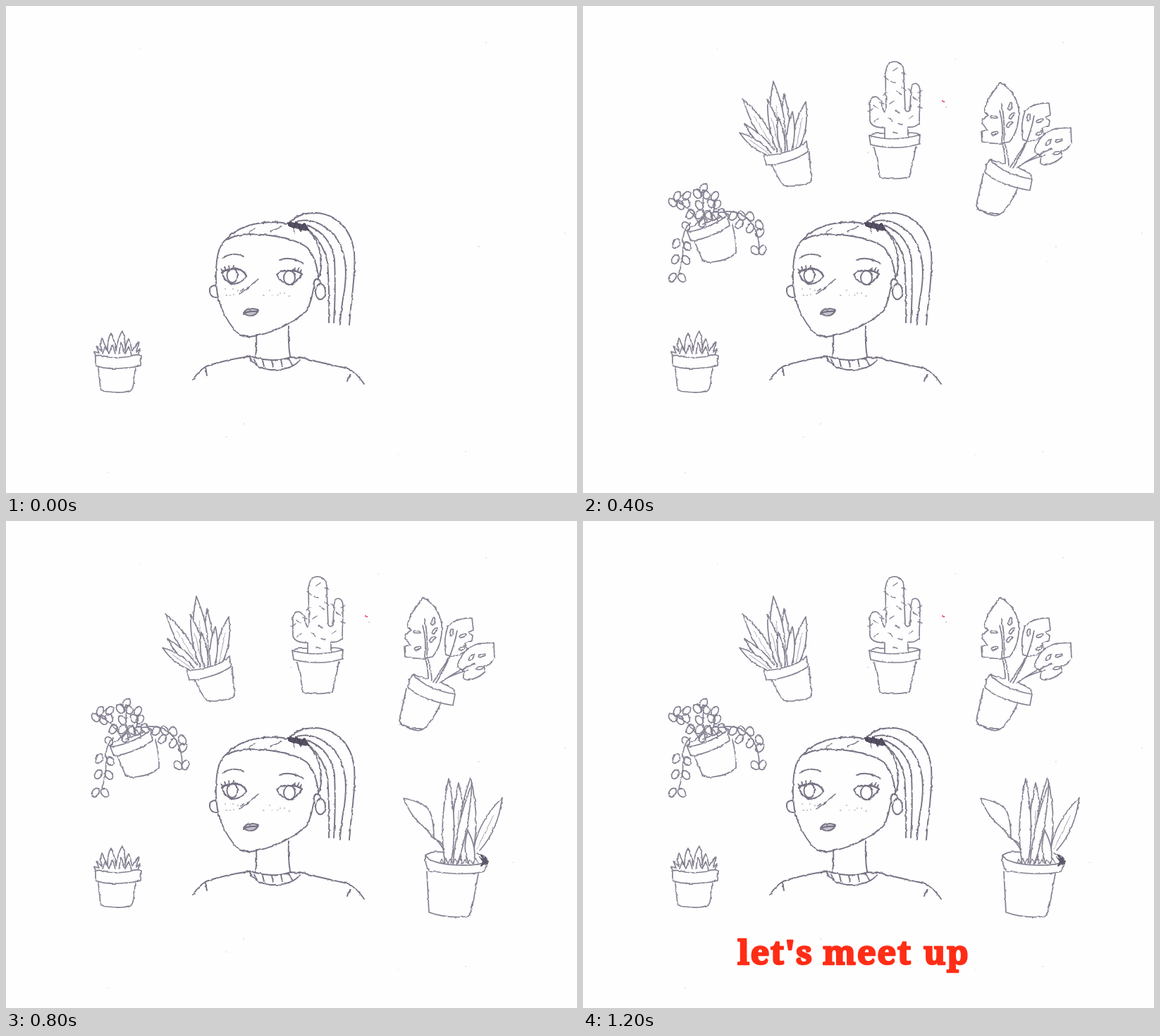
An HTML page for the animation above (1400 ms loop, 810x692 px).

```html
<!DOCTYPE html>
<html lang="en">
<head>
<meta charset="utf-8">
<title>Plants and a portrait</title>
<style>
html, body { margin: 0; width: 100%; height: 100%; overflow: hidden; background: #fefefe; }
svg { display: block; width: 810px; height: 692px; }
.pencil { fill: none; stroke: #858091; stroke-width: 1.7; stroke-linecap: round; stroke-linejoin: round; }
.pencil .solid { fill: #fefefe; }
#girl { stroke: #777183; stroke-width: 1.9; }
.speck { stroke: #c9c6cf; stroke-width: 1.4; }
#message {
  font: 700 47.5px "Noto Serif", "DejaVu Serif", serif; letter-spacing: 1.5px; text-anchor: middle;
  fill: #ff2d16; stroke: #ff2d16; stroke-width: 2.4; stroke-linejoin: round;
}
</style>
</head>
<body>
<svg viewBox="0 0 810 692">
  <filter id="rough" filterUnits="userSpaceOnUse" x="0" y="0" width="810" height="692" color-interpolation-filters="sRGB">
    <feTurbulence type="fractalNoise" baseFrequency=".14" numOctaves="2" seed="4"/>
    <feDisplacementMap in="SourceGraphic" scale="3" xChannelSelector="R" yChannelSelector="G"/>
  </filter>
  <g class="pencil" filter="url(#rough)">
    <g id="girl"></g>
    <g id="succulent"></g>
    <g id="trailing" data-start="100"></g>
    <g id="aloe" data-start="200"></g>
    <g id="cactus" data-start="300"></g>
    <g id="monstera" data-start="400"></g>
    <g id="tall" data-start="500"></g>
  </g>
  <text id="message" y="630"><tspan x="273">let's</tspan><tspan x="403.5">meet</tspan><tspan x="515.5">up</tspan></text>
</svg>
<script>
const byId = id => document.getElementById(id);
const path = (d, attrs = '') => `<path d="${d}" ${attrs}/>`;
const solid = d => path(d, 'class="solid"');
const oval = (x, y, rx, ry, turn = 0, attrs = '') =>
  `<ellipse cx="${x}" cy="${y}" rx="${rx}" ry="${ry}" transform="rotate(${turn} ${x} ${y})" ${attrs}/>`;
const dots = (points, attrs = '') => path(points.map(([x, y]) => `M${x} ${y}h.1`).join(''), attrs);
const specks = points => dots(points, 'class="speck"');

// A pointed leaf whose two edges bow out sideways from base to tip.
function leaf(bx, by, tx, ty, width, rib = false) {
  const dx = tx - bx, dy = ty - by, length = Math.hypot(dx, dy);
  const nx = -dy / length * width, ny = dx / length * width;
  const mx = bx + dx * .45, my = by + dy * .45;
  const edges = `M${bx + nx * .3} ${by + ny * .3}Q${mx + nx} ${my + ny} ${tx} ${ty}` +
    `Q${mx - nx} ${my - ny} ${bx - nx * .3} ${by - ny * .3}`;
  return solid(edges) + (rib ? path(`M${bx} ${by}L${bx + dx * .65} ${by + dy * .65}`, 'stroke-width="1" opacity=".7"') : '');
}

byId('girl').innerHTML =
  // head and hair
  path('M313 331Q302 339 299 362C296 390 299 413 306 430Q316 453 330 466Q338 472 352 469C376 465 401 453 421 438Q432 428 435 407L437 399') +
  path('M313 332Q329 324 346 324C382 325 409 330 427 343Q440 357 443 385') +
  path('M313 331C325 316 350 308 376 307Q391 307 402 310M428 317Q444 334 447 358Q449 375 442 389') +
  path('M345 322L353 315M375 320L389 315M408 318L410 324M383 318L391 313', 'stroke-width="1.4"') +
  path('M403 307Q415 294 440 294C470 296 490 318 494 350C496 380 491 408 489 430L487 453') +
  path('M412 306Q440 299 465 325C483 347 484 375 480 405Q475 430 474 453') +
  path('M428 312Q460 324 466 360Q468 405 465 450M429 318Q450 335 456 365Q459 400 458 450') +
  path('M403 310L425 316', 'stroke-width="7" stroke="#5a5467"') +
  path('M400 308L408 316L412 306L418 319L423 309L429 319', 'stroke="#4b4658"') +
  // ears
  path('M437 397Q436 386 443 388Q447 391 445 396') + oval(446, 406, 7, 11) +
  path('M298 397Q288 397 289 406Q291 415 299 414') +
  // eyes and brows
  path('M307 359Q320 348 337 356M388 361Q402 355 421 365') +
  path('M306 379Q310 392 322 395Q335 394 341 384M384 382Q391 394 402 396Q412 394 420 381') +
  path('M306 379Q318 370 333 375Q339 379 341 384M384 382Q392 374 402 376Q414 376 420 381', 'stroke-width="2.4"') +
  oval(321, 383, 7.5, 10) + oval(402, 386, 8, 10) +
  path('M308 379L305 374M312 376L310 371M317 374L316 369M322 373L323 369M408 376L410 372M413 377L416 372M417 379L420 375') +
  // nose, freckles, mouth
  path('M332 409L358 388M333 405L337 402', 'stroke-width="1.6"') +
  dots([[311, 402], [313, 410], [318, 411], [322, 403], [323, 410], [329, 405],
        [366, 411], [374, 404], [377, 411], [386, 411], [389, 408], [395, 408], [401, 412]], 'stroke-width="1.7" opacity=".7"') +
  path('M337 436Q342 429 346 431Q352 428 358 433Q354 441 345 440Q339 439 337 436ZL347 434L357 434', 'fill="#c4c0cb"') +
  // neck and jumper
  path('M355 467Q356 485 354 498M401 455Q400 480 403 498') +
  path('M345 497L355 500Q380 507 404 499L417 500M346 499Q352 514 375 517Q405 518 417 503') +
  path('M352 502L355 509M364 504L366 512M377 504L379 513M390 503L392 512M401 501L406 510') +
  path('M345 498Q310 503 284 512Q274 518 265 531M283 514L285 525M417 499Q450 508 485 515Q498 522 508 537M489 524Q485 528 484 533') +
  specks([[191, 61], [313, 612], [337, 594], [556, 638], [145, 663], [671, 342], [793, 323], [652, 633], [680, 52]]);

byId('succulent').innerHTML =
  path('M127 496L125 491L132 493L128 483L136 491Q133 480 136 472L144 490Q144 472 149 465Q154 475 156 490' +
       'Q159 470 165 462Q170 475 169 489Q171 478 174 472L179 490L188 477L185 492L190 487L187 496') +
  path('M137 494L141 483L146 494L151 481L155 494M160 494L163 478L169 494L174 484L178 495') +
  solid('M127 497Q135 495 145 499Q160 501 175 498Q186 494 192 497L191 511Q180 514 160 515Q140 516 127 511Z') +
  path('M131 515L134 543Q136 548 145 548Q165 551 178 546Q182 540 183 514');

const leaves = [
  [146, 313], [132, 338], [148, 341], [131, 360], [146, 361], [127, 386], [140, 386],
  [213, 298], [225, 298], [222, 310], [237, 299], [237, 316], [250, 311], [251, 322], [244, 347], [255, 346],
  [127, 279], [134, 270], [138, 283], [147, 270], [146, 280], [152, 296], [162, 267], [171, 259], [174, 268],
  [187, 270], [182, 281], [190, 282], [165, 283], [165, 296], [178, 297], [187, 298], [197, 295], [170, 308]
];
byId('trailing').innerHTML =
  path('M152 308Q140 320 142 340Q142 365 135 382M200 292Q225 290 240 310Q250 325 250 345') +
  path('M165 310Q152 285 130 276M173 308Q168 280 172 262M180 306Q188 290 187 275M158 312L180 290L192 306M170 310L196 300') +
  leaves.map(([x, y], i) => oval(x, y, 4.8, 6.8, i % 2 ? 32 : -35)).join('') +
  solid('M148 321Q166 319 184 310Q198 304 205 296L208 312Q182 330 153 334Z') +
  path('M148 321Q150 314 160 311M205 296Q200 291 192 294') +
  path('M158 334L169 360Q172 365 182 364Q205 362 217 351Q218 335 212 311') +
  specks([[528, 75], [515, 144]]);

byId('aloe').innerHTML =
  leaf(290, 204, 285, 125, 10) + leaf(280, 207, 270, 107, 17, true) + leaf(302, 202, 316, 136, 13, true) +
  leaf(271, 202, 227, 132, 13, true) + leaf(279, 206, 262, 133, 11, true) + leaf(293, 205, 297, 150, 9) +
  leaf(269, 207, 229, 168, 9) + leaf(263, 209, 222, 180, 10, true) + leaf(284, 207, 277, 158, 8) +
  solid('M256 211Q264 214 290 207Q308 202 317 192L319 207Q305 217 285 222Q268 227 260 225Z') +
  path('M268 226Q276 245 285 255Q300 258 318 252Q325 250 324 246Q322 230 321 207');

const spikes = [
  [430, 103], [429, 125], [455, 96], [455, 118], [443, 90], [440, 108], [448, 124], [438, 137], [446, 150], [436, 162],
  [408, 148], [424, 138], [415, 144], [416, 162], [450, 168], [464, 121], [478, 122], [478, 144], [471, 132], [466, 158], [443, 180]
];
byId('cactus').innerHTML =
  path('M428 189L428 173Q409 173 407 163L407 138Q408 128 416 129Q424 131 424 143L427 150Q430 150 430 145L429 95Q431 79 442 79' +
       'Q455 80 455 95L457 147Q459 152 464 148L465 122Q466 110 472 110Q479 112 478 125L477 165Q474 173 461 172L461 188') +
  path(spikes.map(([x, y], i) => `M${x - 3} ${y - [3, -2, 1][i % 3]}l6 ${[5, -4, 2][i % 3]}`).join(''), 'stroke-width="1.4"') +
  solid('M406 184Q440 194 478 183L477 196Q445 206 408 197Z') +
  path('M406 184Q413 180 427 181M462 180Q474 180 478 183') +
  path('M413 201Q419 225 421 243Q440 248 463 243Q468 225 472 200') +
  dots([[510, 135], [512, 136]], 'stroke="#d83a5c" stroke-width="2"') +
  specks([[515, 144], [659, 363], [405, 208]]);

byId('monstera').innerHTML =
  path('M594 139Q599 170 597 192Q603 208 604 226M591 148Q597 170 594 192Q599 210 599 224M640 155Q634 192 610 230M630 192Q620 208 606 229M665 203Q638 213 616 230M655 212Q630 219 618 228') +
  path('M591 109Q612 118 618 145Q620 175 605 193Q590 198 566 193L565 178L574 176L566 167L568 160L575 155L569 151Q570 140 578 128Z') +
  path('M627 149Q640 137 661 138L663 155L656 158L662 163L661 170L651 174L655 182Q640 196 624 190Q620 170 627 149Z') +
  path('M642 200Q650 180 671 174L692 173L693 195L685 204L678 206L680 214Q668 225 655 226Q645 225 651 215L641 208Z') +
  [[606, 143, 15], [608, 156, 40], [605, 168, 55], [583, 158, 100], [584, 181, 70], [632, 158, 15], [648, 163, 70],
   [647, 181, 60], [660, 194, 40], [675, 191, 70], [672, 209, 80]].map(([x, y, turn]) => oval(x, y, 2, 5, turn)).join('') +
  path('M577 218Q571 225 570 236Q590 255 634 262L637 246Q598 240 577 218ZQ586 222 597 224M616 230Q636 236 637 246') +
  path('M568 238L558 283Q560 292 583 298Q592 298 598 290Q612 272 616 260M560 288Q575 296 590 295');

byId('tall').innerHTML =
  path('M564 394Q590 399 600 410Q607 424 607 450Q620 460 628 484M564 394Q573 416 585 428Q598 438 607 452Q619 454 624 470') +
  leaf(668, 466, 704, 393, 15, true) + leaf(642, 486, 642, 372, 15, true) + leaf(627, 486, 628, 366, 14) +
  leaf(652, 486, 659, 365, 20, true) + leaf(637, 488, 661, 372, 10) + leaf(660, 487, 655, 440, 11) +
  path('M616 486l2 -6l3 7l3 -8l3 8l3 -7l4 7l3 -6l4 6l3 -7l4 7l3 -6l4 6l3 -6l4 6l4 -8l4 7', 'stroke-width="1.3"') +
  solid('M595 475Q602 487 640 489Q670 490 684 484L678 498Q650 505 600 497Q594 488 595 475Z') +
  path('M595 475Q605 468 622 471M668 473Q682 475 684 484') +
  path('M672 477L680 488L675 475L683 488L680 478L674 490L684 483', 'stroke="#5d586a" stroke-width="2"') +
  path('M597 498L600 556Q625 565 655 562Q660 558 664 535L670 501') +
  specks([[719, 485]]);

const timed = [...document.querySelectorAll('[data-start]')];
const show = (element, visible) => element.setAttribute('visibility', visible ? 'visible' : 'hidden');

function draw() {
  const time = performance.now() % 1400;
  timed.forEach(group => show(group, time >= +group.dataset.start));
  // The message shows for 200 ms, then blinks off for 100 ms.
  show(byId('message'), time >= 600 && (time - 600) % 300 < 200);
  requestAnimationFrame(draw);
}
draw();
</script>
</body>
</html>
```
